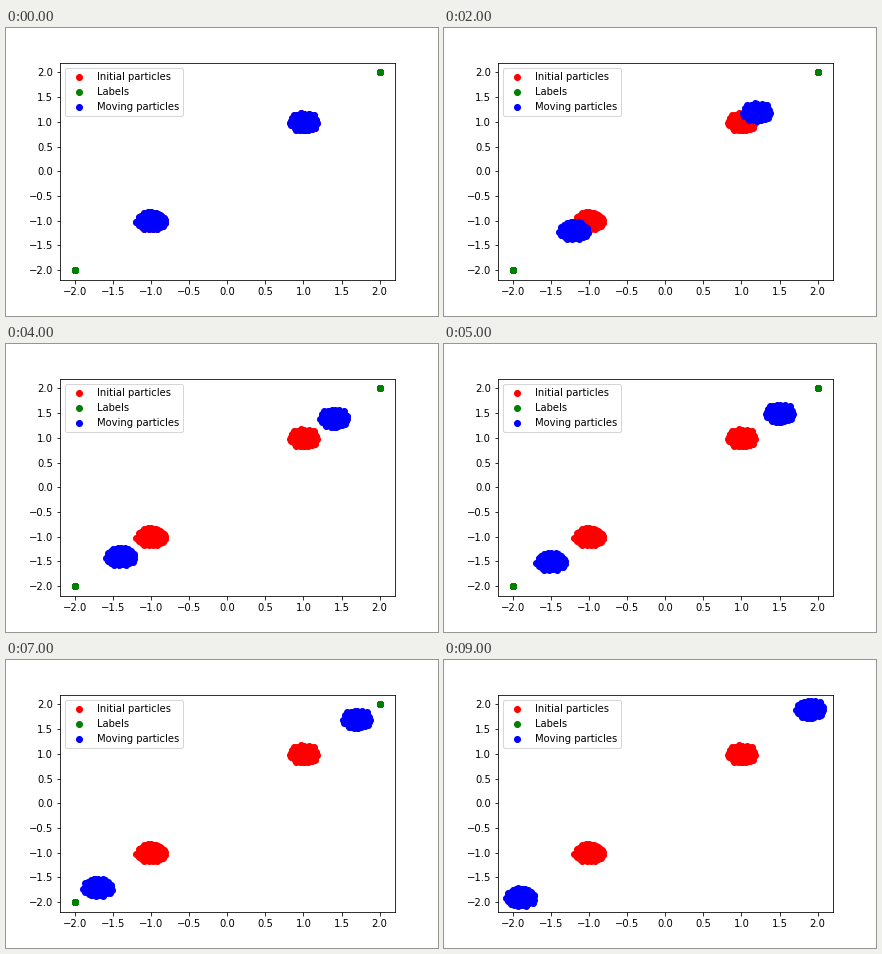
These frames come from a looping animation (432x288 px, 10000 ms). A matplotlib script:

```python
import numpy as np
import matplotlib.pyplot as plt
from matplotlib.animation import FuncAnimation

FRAMES, INTERVAL = 10, 1000
STEP = 0.1
COUNT = 100
RADIUS = 0.2
GOLDEN = np.pi * (3 - np.sqrt(5))

plt.rcParams["font.family"] = "DejaVu Sans"
plt.rcParams["font.size"] = 10
rng = np.random.default_rng(4)


def cluster(centre, phase):
    """Evenly filled disc with a slightly ragged edge, outermost particle first."""
    k = np.arange(COUNT)
    r = RADIUS * np.sqrt(1 - k / COUNT) * (1 - 0.12 * rng.random(COUNT))
    a = phase + GOLDEN * k
    return centre + np.column_stack([r * np.cos(a), r * np.sin(a)])


start = np.vstack([cluster(1, -0.1), cluster(-1, np.pi + 0.13)])
side = np.repeat([1.0, -1.0], COUNT)[:, None]
labels = 2 * side * np.ones((1, 2))

fig, ax = plt.subplots(figsize=(6, 4), dpi=72, facecolor="white")
fig.subplots_adjust(left=0.125, right=0.9, bottom=0.125, top=0.88)

ax.scatter(*start.T, color="red", label="Initial particles")
ax.scatter(*labels.T, color="green", label="Labels")
moving = ax.scatter(*start.T, color="blue", label="Moving particles")

ticks = np.arange(-2, 2.1, 0.5)
ax.set(xlim=(-2.2, 2.2), ylim=(-2.2, 2.2), xticks=ticks, yticks=ticks)
ax.legend(loc="upper left")


def update(i):
    moving.set_offsets(start + STEP * i * side)
    return (moving,)


def reset():
    return update(0)


anim = FuncAnimation(fig, update, frames=FRAMES, init_func=reset,
                     interval=INTERVAL, repeat=True, repeat_delay=0)
plt.show()
```
